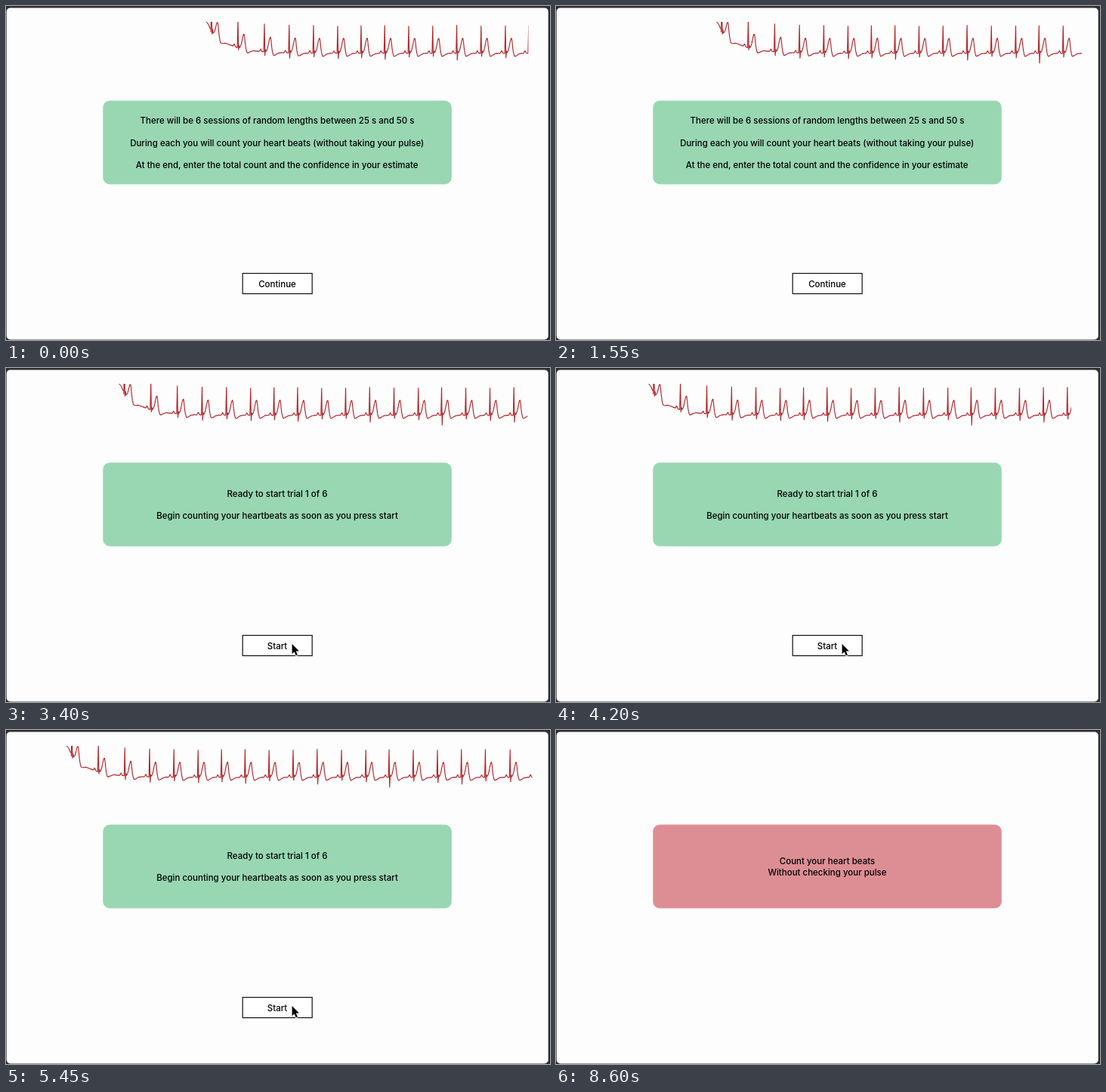
Write an HTML page that moves like this. It is 720 px wide and 443 px high and loops after 9 s.

```html
<!DOCTYPE html>
<html lang="en">
<head>
<meta charset="utf-8">
<title>Heartbeat counting task</title>
<style>
  html, body { margin: 0; width: 100%; height: 100%; overflow: hidden; background: #2e2d2f; }
  svg { display: block; width: 100vw; height: 100vh; }
  text { font: 500 11.5px Inter, Roboto, sans-serif; text-anchor: middle; fill: #000; }
  .off { display: none; }
  .button { fill: #fff; stroke: #111; stroke-width: 1.2; }
  #trace { fill: none; stroke: #b3262c; stroke-width: 1.15; stroke-linejoin: round; }
</style>
</head>
<body>
<svg viewBox="0 0 720 443">
  <defs>
    <clipPath id="view"><rect id="drawn" x="0" y="21" height="70"/></clipPath>
  </defs>
  <rect x="0.7" y="2.4" width="717" height="440" rx="5" fill="#fdfdfd"/>
  <g id="ecg"><path id="trace" clip-path="url(#view)"/></g>
  <rect id="panel" x="128.3" y="125.5" width="461.5" height="111" rx="9"/>

  <g id="intro">
    <text x="359" y="156">There will be 6 sessions of random lengths between 25 s and 50 s</text>
    <text x="358.7" y="185.5">During each you will count your heart beats (without taking your pulse)</text>
    <text x="358.7" y="215">At the end, enter the total count and the confidence in your estimate</text>
    <rect class="button" x="313.2" y="354.6" width="92" height="27"/>
    <text x="359" y="373">Continue</text>
  </g>
  <g id="ready">
    <text x="359" y="171">Ready to start trial 1 of 6</text>
    <text x="359" y="200.3">Begin counting your heartbeats as soon as you press start</text>
    <rect class="button" x="313.2" y="354.6" width="92" height="27"/>
    <text x="359" y="373">Start</text>
  </g>
  <g id="count">
    <text x="359" y="178">Count your heart beats</text>
    <text x="359" y="193">Without checking your pulse</text>
  </g>
  <path id="cursor" d="M0 0V13.2L3 10.4L5.2 15.4L7.4 14.5L5.2 9.6H9.3Z"
        fill="#000" stroke="#fff" stroke-width="1.6" paint-order="stroke"/>
</svg>
<script>
const LOOP = 9000, STEP = 50;
const READY_AT = 3300, COUNT_AT = 5500;
const SPEED = 0.0339;               // scroll, px per ms
const CHUNK = 19, CHUNK_LAG = 236;  // samples arrive in blocks
const $ = id => document.getElementById(id);

// Beat positions and the depth of the dip after each spike
const beats = [272, 307, 342, 374.8, 407, 439, 470, 501.2, 533, 564.8, 596.6, 628.8, 661,
               691.8, 723.8, 755.8, 787.5, 819.2, 852, 884];
const dips = [3, 3, 5, 7, 5, 7, 6, 8, 5, 4, 9, 4, 6, 13, 5, 7, 9, 5, 6, 6];

let seed = 7;
const noise = () => (seed = seed * 16807 % 2147483647) / 2147483647 - 0.5;
const bump = (d, left, right) => Math.exp(-((d / (d < 0 ? left : right)) ** 2));
const base = x => 62.7 - 28.5 * Math.exp(-(x - 272) / 26);

function wave(x, beat, next) {
  const d = x - beat;
  return base(x) - 20 * bump(d - 8, 3.3, 1.7) + 4 * bump(d - 12.2, 1.2, 5)
    - 3.2 * bump(x - next + 5, 1.1, 1.1) + noise() * 0.5;
}

function buildTrace() {
  const pts = [[264.5, 20], [266, 22], [268, 24.5], [270, 29.5], [271.2, 31]];
  const add = (x, y) => pts.push([x, y]);
  beats.forEach((b, i) => {
    const y = base(b), next = beats[i + 1] || b + 32;
    add(b - 0.9, y);
    add(b, y - 36.5 + noise() * 1.6);
    add(b + 0.7, y + dips[i]);
    add(b + 1.5, y - 3);
    for (let x = b + 2.2; x < next - 1.2; x += 0.5) add(x, wave(x, b, next));
  });
  $('trace').setAttribute('d', 'M' + pts.map(p => p.map(v => v.toFixed(2)).join()).join('L'));
}

const mix = (a, b, p) => a + (b - a) * p;

// Tip of the pointer, or null while it is away
function pointer(t) {
  if (t < 2150 || t >= 7300) return null;
  if (t < 2500) {
    const p = 1 - (1 - (t - 2150) / 350) ** 2;
    return [mix(712, 378.6, p), mix(240, 366, p)];
  }
  const p = Math.max(0, (t - 6950) / 300) ** 2;
  return [mix(378.6, 695, p), mix(366, 9, p)];
}

const show = (id, on) => $(id).classList.toggle('off', !on);

function render(t) {
  const counting = t >= COUNT_AT;
  show('intro', t < READY_AT);
  show('ready', t >= READY_AT && !counting);
  show('count', counting);
  show('ecg', !counting);
  $('panel').setAttribute('fill', counting ? '#dd8e94' : '#99d7b3');

  const blocks = Math.floor((t + CHUNK_LAG) * SPEED / CHUNK);
  $('drawn').setAttribute('width', 691.35 + blocks * CHUNK);
  $('ecg').setAttribute('transform', `translate(${-t * SPEED} 0)`);

  const at = pointer(t);
  show('cursor', at);
  if (at) $('cursor').setAttribute('transform', `translate(${at})`);
}

function show_(id, on) { $(id).classList.toggle('off', !on); }

buildTrace();
const start = performance.now();
function tick() {
  const t = (performance.now() - start) % LOOP;
  render(Math.floor(t / STEP) * STEP);
  requestAnimationFrame(tick);
}
render(0);
requestAnimationFrame(tick);
</script>
</body>
</html>
```
